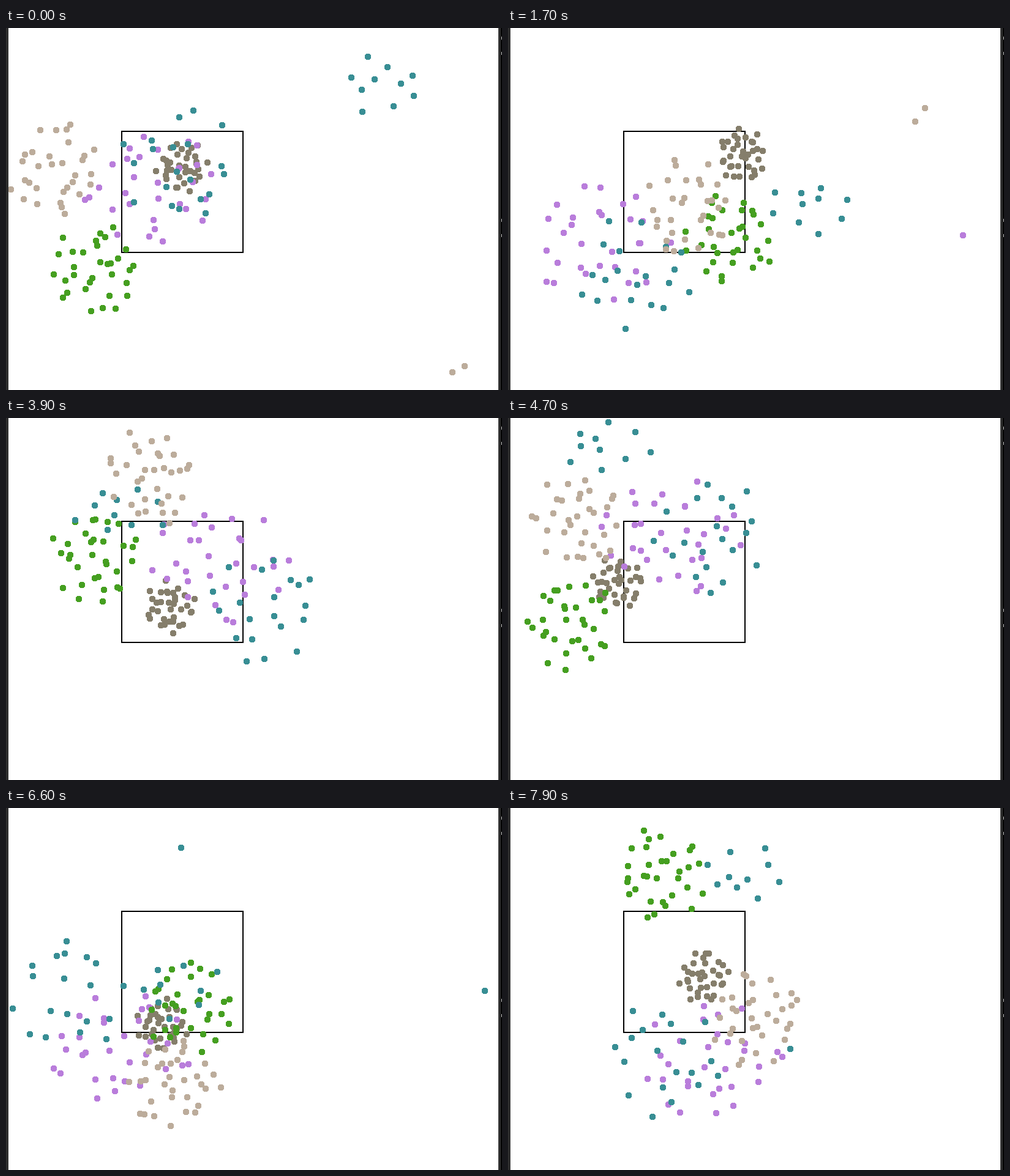
A matplotlib script that plays this animation: 810 by 592 pixels, repeating every 8000 ms.

```python
import numpy as np
import matplotlib.pyplot as plt
from matplotlib.animation import FuncAnimation
from matplotlib.patches import Rectangle

W, H, DPI = 810, 592, 100
FRAMES, STEP = 80, 100
LEFT, SPAN = 4, 800                       # the field wraps at its edges
HUB = np.array([270, 268])                # flocks circle around this point
TIMES = np.array([0, 1700, 2800, 3900, 4700, 6600, 7900])
PX = 72 / DPI

TEAL, GREEN, PURPLE = "#388e94", "#459f20", "#b97ddb"
TAN, BROWN = "#bcac9b", "#857e6b"

rng = np.random.default_rng(12)


def disc(n):
    """Evenly spread, slightly shaken points in the unit disc."""
    i = np.arange(n)
    a = i * np.pi * (3 - 5 ** 0.5) + rng.uniform(0, 2 * np.pi)
    r = ((i + 0.5) / n) ** 0.5
    p = np.c_[r * np.cos(a), r * np.sin(a)] + rng.normal(0, 0.1, (n, 2))
    return p / np.maximum(1, np.hypot(*p.T))[:, None]


def ease(s):
    s = np.clip(s, 0, 1)
    return s * s * (3 - 2 * s)


def spline(t, y, slope, now):
    """Cubic Hermite curve through y at times t."""
    i = min(np.searchsorted(t, now, "right"), len(t) - 1) - 1
    d = t[i + 1] - t[i]
    s = (now - t[i]) / d
    e = ease(s)
    return ((1 - e) * y[i] + e * y[i + 1]
            + d * s * (1 - s) * ((1 - s) * slope[i] - s * slope[i + 1]))


class Flock:
    """A cloud of dots that swings around the hub through a few waypoints.

    strays = (count, offset, start, end): dots that have wrapped around an
    edge and ease back to their flock.
    """

    def __init__(self, color, n, size, path, strays=(0, (0, 0), 0, 1)):
        x, y = (np.array(path) - HUB).T
        polar = np.c_[np.unwrap(np.arctan2(y, x)), np.hypot(x, y)]
        self.curve = TIMES, polar, np.gradient(polar, TIMES, axis=0)
        self.color, self.size, self.strays = color, size, strays
        self.pts = disc(n)
        self.phase = rng.uniform(0, 2 * np.pi, (n, 2))

    def place(self, ms):
        angle, r = spline(*self.curve, ms)
        centre = HUB + r * np.array([np.cos(angle), np.sin(angle)])
        c, s = np.cos(0.0004 * ms), np.sin(0.0004 * ms)
        p = self.pts + 0.05 * np.sin(0.002 * ms + self.phase)
        p = centre + self.size * (p @ np.array([[c, -s], [s, c]]))
        count, offset, start, end = self.strays
        p[:count] += np.array(offset) * (1 - ease((ms - start) / (end - start)))
        p = (p - (LEFT, 0)) % (SPAN, H) + (LEFT, 0)
        return np.floor(p)


flocks = [
    Flock(BROWN, 34, (42, 43),
          [(288, 227), (382, 209), (358, 342), (268, 311),
           (180, 271), (256, 356), (321, 277)]),
    Flock(PURPLE, 31, (112, 92),
          [(240, 262), (148, 352), (292, 372), (348, 240),
           (266, 196), (187, 393), (334, 415)],
          strays=(1, (SPAN, 0), 600, 3900)),
    Flock(GREEN, 32, (72, 76),
          [(147, 394), (363, 344), (308, 198), (146, 228),
           (102, 335), (299, 328), (250, 110)]),
    Flock(TEAL, 20, (96, 98),
          [(285, 230), (210, 405), (340, 455), (427, 312),
           (335, 193), (104, 302), (256, 408)],
          strays=(1, (SPAN, 0), 5800, 8900)),
    Flock(TEAL, 10, (76, 47),
          [(610, 92), (490, 294), (263, 300), (185, 155),
           (160, 50), (284, 300), (390, 108)],
          strays=(1, (0, H), 5500, 8000)),
    Flock(TAN, 33, (74, 80),
          [(80, 232), (292, 296), (358, 156), (236, 100),
           (115, 172), (275, 452), (408, 345)],
          strays=(2, (660, -274), 0, 3800)),
]

fig = plt.figure(figsize=(W / DPI, H / DPI), dpi=DPI, facecolor="white")
ax = fig.add_axes([0, 0, 1, 1])
ax.set(xlim=(0, W), ylim=(H, 0))
ax.axis("off")


def bar(x, y, w, h, color):
    ax.add_patch(Rectangle((x, y), w, h, fc=color, lw=0, zorder=5, antialiased=False))


ax.add_patch(Rectangle((189, 169), 198, 198, fill=False, ec="black",
                       lw=2 * PX, joinstyle="miter", zorder=1))
bar(0, 0, LEFT, H, "#2e2e2e")
bar(804, 0, 4, H, "#2e2e2e")
bar(808, 0, 2, H, "black")
for y in (14, 39, 312, 337):
    bar(809, y, 1, 5, "#d0d0d0")

colors = [f.color for f in flocks for _ in f.pts]
dots = ax.scatter(*np.zeros((2, len(colors))), s=(10 * PX) ** 2, c=colors,
                  linewidths=0, antialiased=False, zorder=2)


def draw(i):
    dots.set_offsets(np.vstack([f.place(i * STEP) for f in flocks]))
    return dots,


anim = FuncAnimation(fig, draw, frames=FRAMES, interval=STEP, repeat=True,
                     repeat_delay=0, blit=False)
plt.show()
```
